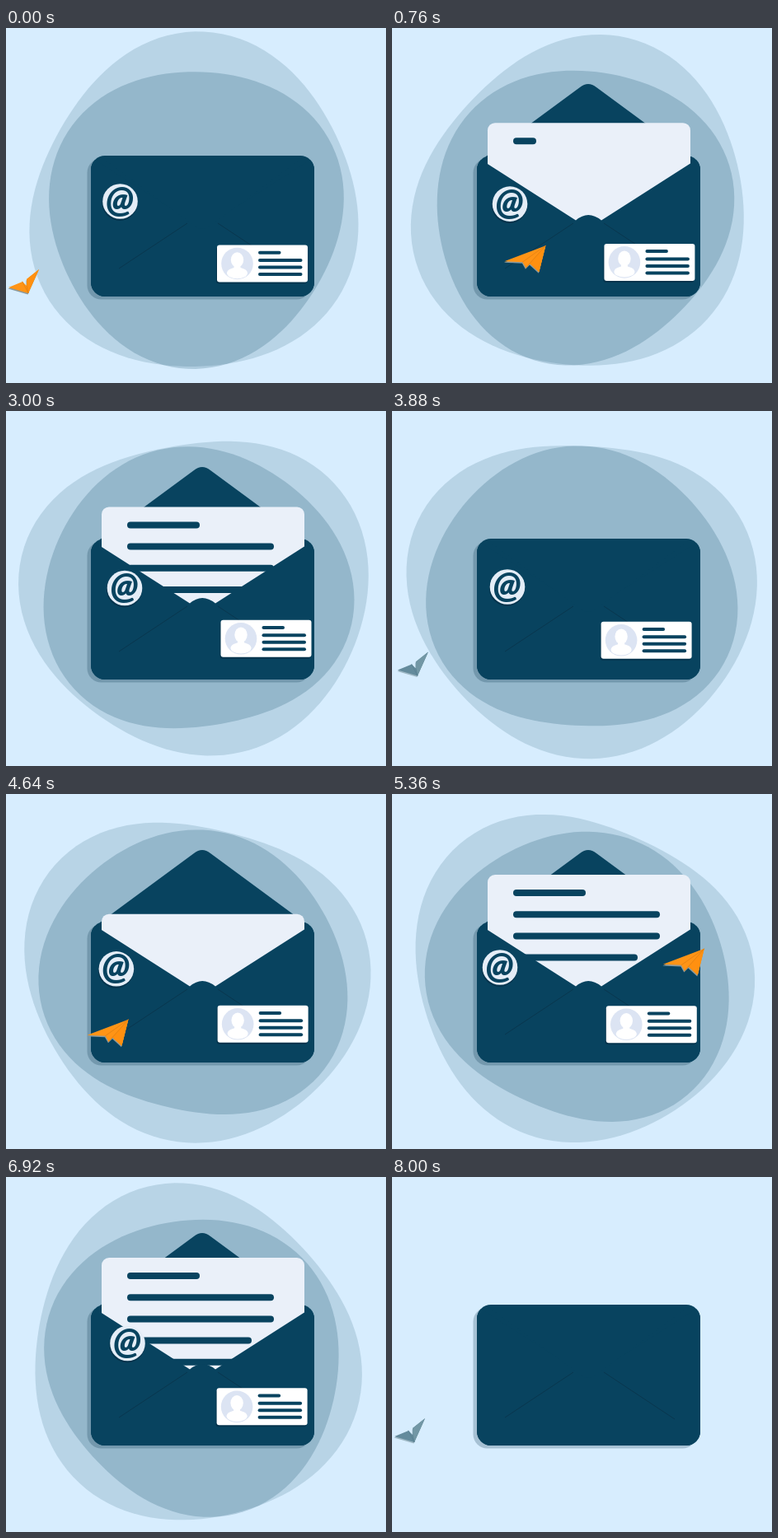
Write an HTML page with a canvas that moves like this. It is 461 by 431 pixels and loops after 8040 ms.

```html
<!DOCTYPE html>
<html lang="en">
<head>
<meta charset="utf-8">
<title>Mail envelope</title>
<style>
  html, body { margin: 0; width: 461px; height: 431px; overflow: hidden; background: #d7edfe; }
  canvas { display: block; }
</style>
</head>
<body>
<canvas id="stage" width="461" height="431"></canvas>
<script>
const ctx = document.getElementById('stage').getContext('2d');
const LOOP = 8040, END = 8000, CYCLE = 4000, STEP = 40, TURN = Math.PI * 2;
const NAVY = '#08435f', BG = '#d7edfe', PAPER = '#eaf0f9';

// Floating parts, rows of time, x, y
const BADGE = [[0, 138.5, 210.5], [1560, 148.5, 215.5], [3000, 144, 215],
  [3880, 140, 213.5], [5360, 131, 210.5], [6920, 147.5, 202]];
const CARD = [[0, 256, 263.5], [1560, 259, 258.5], [3000, 260.5, 253.8],
  [3880, 253.6, 255.8], [5360, 259.8, 257.3], [6920, 255.6, 256.3]];

// Plane outline: left wing, three notch points, then the two far corners
const REST = [[-17, 7], [0, 0], [5, 5], [5, -3], [20, -15], [7, 14]];
const GLIDE = [[-25, 3], [-3, 4], [1, 11], [6, 6], [17, 16], [25, -16]];
const TILT = [[-23, 9], [-2, 3], [4, 12], [7, 6], [23, 8], [18, -12]];

const rad = deg => deg * Math.PI / 180;
const clamp = v => Math.min(1, Math.max(0, v));
const mix = (a, b, p) => a.map((v, i) => v + (b[i] - v) * p);
const mixAll = (a, b, p) => a.map((pt, i) => mix(pt, b[i], p));
const ease = (t, from, to) => {
  const p = clamp((t - from) / (to - from));
  return p * p * (3 - 2 * p);
};

// Closed smooth curve in time through keyed rows
function drift(rows, t) {
  const n = rows.length;
  const row = i => {
    const [time, ...pos] = rows[(i + n) % n];
    return [time + Math.floor(i / n) * END, ...pos];
  };
  let i = 0;
  while (row(i + 1)[0] <= t) i++;
  const [a, b, c, d] = [row(i - 1), row(i), row(i + 1), row(i + 2)];
  const span = c[0] - b[0], p = (t - b[0]) / span, q = 1 - p;
  return [1, 2].map(k => {
    const m0 = (c[k] - a[k]) / (c[0] - a[0]) * span;
    const m1 = (d[k] - b[k]) / (d[0] - b[0]) * span;
    return b[k] * (1 + 2 * p) * q * q + m0 * p * q * q + c[k] * p * p * (3 - 2 * p) - m1 * p * p * q;
  });
}

function fillRound(x, y, w, h, r, color) {
  ctx.fillStyle = color;
  ctx.beginPath();
  ctx.roundRect(x, y, w, h, r);
  ctx.fill();
}

function fillEllipse(x, y, rx, ry, color) {
  ctx.fillStyle = color;
  ctx.beginPath();
  ctx.ellipse(x, y, rx, ry, 0, 0, TURN);
  ctx.fill();
}

function fillPoly(pts, color) {
  ctx.fillStyle = color;
  ctx.beginPath();
  pts.forEach(p => ctx.lineTo(...p));
  ctx.closePath();
  ctx.fill();
}

function bar(x1, x2, y, width) {
  const r = width / 2;
  ctx.strokeStyle = NAVY;
  ctx.lineWidth = width;
  ctx.lineCap = 'round';
  ctx.beginPath();
  ctx.moveTo(x1 + r, y);
  ctx.lineTo(Math.max(x1 + r, x2 - r), y);
  ctx.stroke();
}

// A circle bent by a turning oval and three turning lobes
function blob(x, y, r, oval, lobes, alpha) {
  const pts = Array.from({ length: 120 }, (_, i) => {
    const a = i * TURN / 120;
    const d = r + 4 * Math.cos(2 * a - 0.3)
      + oval.size * Math.cos(2 * a - oval.phase)
      + lobes.size * Math.cos(3 * a - lobes.phase);
    return [x + d * Math.cos(a), y + d * Math.sin(a)];
  });
  fillPoly(pts, `rgba(8,67,95,${alpha})`);
}

function blobs(t) {
  const spin = TURN * t / END;
  const wave = (size, start) => ({ size, phase: rad(start) + spin });
  const sway = rad(253) + spin;
  blob(230 + 3.5 * Math.cos(sway), 220 + 3.5 * Math.sin(sway), 200.5, wave(7.5, 208), wave(9, 93), 0.15);
  blob(230, 223 + 4 * Math.cos(spin + rad(25)), 179, wave(5.5, 200), wave(7, 277), 0.2);
}

function plane(t, away) {
  // Out along a curve, then back along it behind the envelope
  const s = ease(t, 60, 1960) - ease(t, 2100, 3980), q = 1 - s;
  const x = 20 * q * q + 2 * 258 * q * s + 445 * s * s;
  const y = 308 * q * q + 2 * 278 * q * s + 148 * s * s;
  const flying = mixAll(GLIDE, TILT, ease(t, 1360, 1560));
  const roll = ease(t, 120, 480) - ease(t, 1720, 2080);
  const pts = mixAll(REST, flying, roll).map(p => [x + p[0], y + p[1]]);
  const [, a, b, c, far, near] = pts;
  fillPoly(pts.map(p => [p[0] - 0.5, p[1] + 1.6]), away ? '#9db7c4' : '#8c9a9c');
  fillPoly(pts, away ? '#648b9c' : '#ff9416');
  fillPoly([b, c, far, near], away ? '#7297a5' : '#ff9010');
  ctx.strokeStyle = away ? '#587f90' : '#dd7d12';
  ctx.lineWidth = 0.7;
  ctx.beginPath();
  ctx.moveTo(...a);
  ctx.lineTo(...near);
  ctx.lineTo(...b);
  ctx.stroke();
}

// open runs from -1 (folded down) to 1 (standing up)
function flap(open) {
  const y = v => 156 - v * open;
  ctx.fillStyle = NAVY;
  ctx.beginPath();
  ctx.moveTo(114, y(0));
  ctx.lineTo(228, y(84));
  ctx.quadraticCurveTo(238, y(92), 248, y(84));
  ctx.lineTo(362, y(0));
  ctx.fill();
}

function letter(t) {
  const top = 98 + 90 * (1 - ease(t, 400, 900) + ease(t, 2920, 3195));
  fillRound(116, top, 246, 138, 9, PAPER);
  [235, 325, 325, 298, 325].forEach((end, i) => {
    const p = clamp((t - 720 - i * 160) / 160);
    if (p > 0) bar(147, 155 + (end - 155) * p, top + 22 + i * 26.2, 8);
  });
}

function pocket() {
  ctx.save();
  ctx.beginPath();
  ctx.roundRect(103, 155, 271, 171, 17);
  ctx.clip();
  ctx.fillStyle = NAVY;
  ctx.beginPath();
  ctx.moveTo(102, 156);
  ctx.lineTo(223, 233.5);
  ctx.quadraticCurveTo(238, 220.5, 254, 233.5);
  ctx.lineTo(375, 156);
  ctx.lineTo(375, 327);
  ctx.lineTo(102, 327);
  ctx.fill();
  ctx.restore();
  ctx.strokeStyle = 'rgba(10,45,65,.55)';
  ctx.lineWidth = 1;
  ctx.lineCap = 'butt';
  ctx.beginPath();
  ctx.moveTo(137, 292);
  ctx.lineTo(220, 237);
  ctx.moveTo(257, 237);
  ctx.lineTo(343, 294);
  ctx.stroke();
}

function badge(t) {
  const [x, y] = drift(BADGE, t);
  fillEllipse(x - 0.5, y + 2, 21.5, 21.5, 'rgba(0,25,45,.35)');
  fillEllipse(x, y, 21.3, 21.3, '#e4edf7');
  ctx.fillStyle = NAVY;
  ctx.font = 'italic 900 44px Lato, "Open Sans", sans-serif';
  const m = ctx.measureText('@');
  ctx.fillText('@', x + (m.actualBoundingBoxLeft - m.actualBoundingBoxRight) / 2,
    y + (m.actualBoundingBoxAscent - m.actualBoundingBoxDescent) / 2);
}

function card(t) {
  const [x, y] = drift(CARD, t);
  fillRound(x - 1, y + 2, 110, 45, 3, 'rgba(0,25,45,.35)');
  fillRound(x, y, 110, 45, 3, '#fff');
  const cx = x + 24.5, cy = y + 22.5;
  fillEllipse(cx, cy, 19.3, 19.3, '#dce4f3');
  fillEllipse(cx, cy - 4.5, 7.7, 9.3, '#fff');
  fillRound(cx - 4, cy + 2, 8, 8, 2, '#fff');
  fillEllipse(cx, cy + 11.5, 12.5, 6.7, '#fff');
  bar(x + 50, x + 77.5, y + 9.2, 4);
  for (let i = 0; i < 3; i++) bar(x + 50, x + 103.5, y + 18.5 + i * 8.5, 4);
}

function draw(t) {
  const last = t >= END;
  const local = last ? CYCLE : t % CYCLE;
  const away = local > 2030;
  const open = -1 + 2 * (ease(local, 200, 550) - ease(local, 3200, 3560));

  ctx.fillStyle = BG;
  ctx.fillRect(0, 0, 461, 431);
  if (!last) blobs(t);
  if (away) plane(local, true);
  fillRound(98.5, 158.5, 271, 171, 17, 'rgba(8,50,75,.23)');
  fillRound(103, 155, 271, 171, 17, NAVY);
  flap(open);
  if (open > 0) {
    letter(local);
    pocket();
  } else {
    pocket();
    flap(open);
  }
  if (!last) {
    badge(t);
    card(t);
  }
  if (!away) plane(local, false);
}

function tick(now) {
  draw(Math.floor(now % LOOP / STEP) * STEP);
  requestAnimationFrame(tick);
}
draw(0);
requestAnimationFrame(tick);
</script>
</body>
</html>
```
